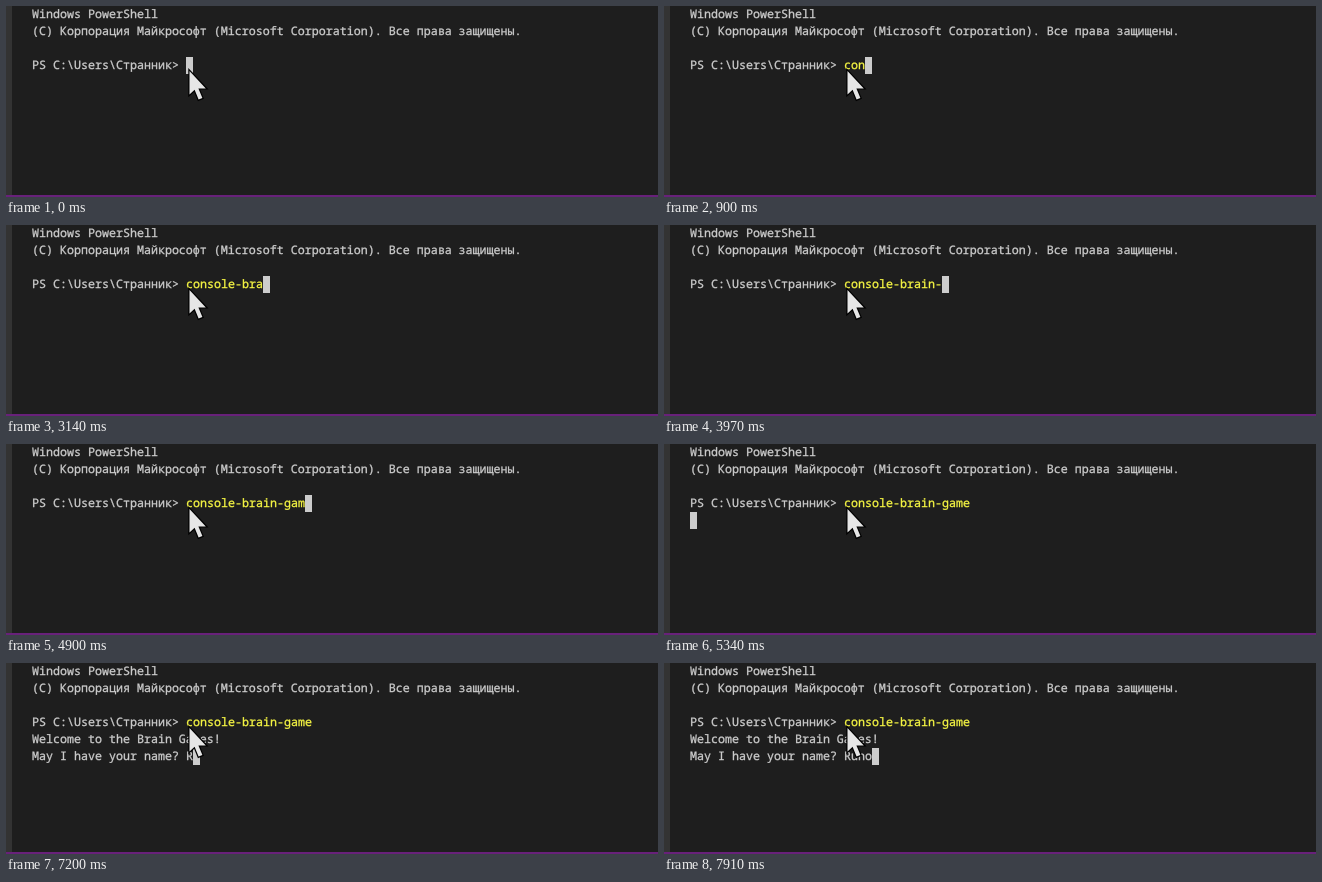
An HTML page that plays this animation: 652x191 px, repeating every 8000 ms.

```html
<!DOCTYPE html>
<html lang="ru">
<head>
<meta charset="utf-8">
<title>Terminal</title>
<style>
html, body { margin: 0; width: 100%; height: 100%; overflow: hidden; background: #1e1e1e; }
svg { display: block; }
text {
  font: 11.6667px "Noto Sans Mono", "DejaVu Sans Mono", monospace;
  fill: #ccc;
  stroke: #ccc;
  stroke-width: .3px;
  white-space: pre;
  text-rendering: geometricPrecision;
}
.cmd { fill: #f5f543; stroke: #f5f543; }
</style>
</head>
<body>
<svg id="stage" width="652" height="191" viewBox="0 0 652 191">
  <rect width="652" height="191" fill="#1e1e1e"/>
  <rect width="6" height="191" fill="#333"/>
  <rect y="189" width="652" height="2" fill="#68217a"/>
  <g id="lines"></g>
  <rect id="caret" width="7" height="17" fill="#ccc"/>
  <path d="M183.5 65V88.5L188.6 83.8L192.6 93.6L196.4 92L192.4 82.4H199.8Z"
        fill="#e6e6e6" stroke="#000" stroke-width="2.4" paint-order="stroke"/>
</svg>
<script>
const LOOP = 8000, LEFT = 26, CELL = 7, ROW = 17, BASELINE = 12, INDENT = 22;
const COMMAND = 'console-brain-game', NAME = 'Runo';
const ENTER = 5340, WELCOME = 5620, ASK = 5760;

// Each entry: time at which one more character appears
const commandKeys = [500, 620, 900, 1180, 1450, 1610, 1870, 2150, 2580,
  2740, 3140, 3420, 3540, 3970, 4500, 4500, 4900, 5060];
const nameKeys = [7200, 7360, 7770, 7910];

const lines = document.getElementById('lines');
const caret = document.getElementById('caret');

function addText(row, col, content, cls) {
  const el = document.createElementNS('http://www.w3.org/2000/svg', 'text');
  el.setAttribute('x', LEFT + col * CELL);
  el.setAttribute('y', row * ROW + BASELINE);
  if (cls) el.setAttribute('class', cls);
  el.textContent = content;
  lines.appendChild(el);
  return el;
}

function setText(el, content) {
  if (el.textContent !== content) el.textContent = content;
}

function moveCaret(row, col) {
  caret.setAttribute('x', LEFT + col * CELL);
  caret.setAttribute('y', row * ROW);
}

const typed = (keys, t) => keys.filter(k => k <= t).length;

addText(0, 0, 'Windows PowerShell');
addText(1, 0, '(C) Корпорация Майкрософт (Microsoft Corporation). Все права защищены.');
addText(3, 0, 'PS C:\\Users\\Странник>');
const command = addText(3, INDENT, '', 'cmd');
const welcome = addText(4, 0, '');
const question = addText(5, 0, '');
const answer = addText(5, INDENT, '');

function draw(t) {
  const n = typed(commandKeys, t), m = typed(nameKeys, t);
  setText(command, COMMAND.slice(0, n));
  setText(welcome, t >= WELCOME ? 'Welcome to the Brain Games!' : '');
  setText(question, t >= ASK ? 'May I have your name?' : '');
  setText(answer, NAME.slice(0, m));
  if (t < ENTER) moveCaret(3, INDENT + n);
  else if (t < WELCOME) moveCaret(4, 0);
  else if (t < ASK) moveCaret(5, 0);
  else moveCaret(5, INDENT + m);
}

const start = performance.now();
function tick() {
  draw((performance.now() - start) % LOOP);
  requestAnimationFrame(tick);
}
draw(0);
requestAnimationFrame(tick);
</script>
</body>
</html>
```
